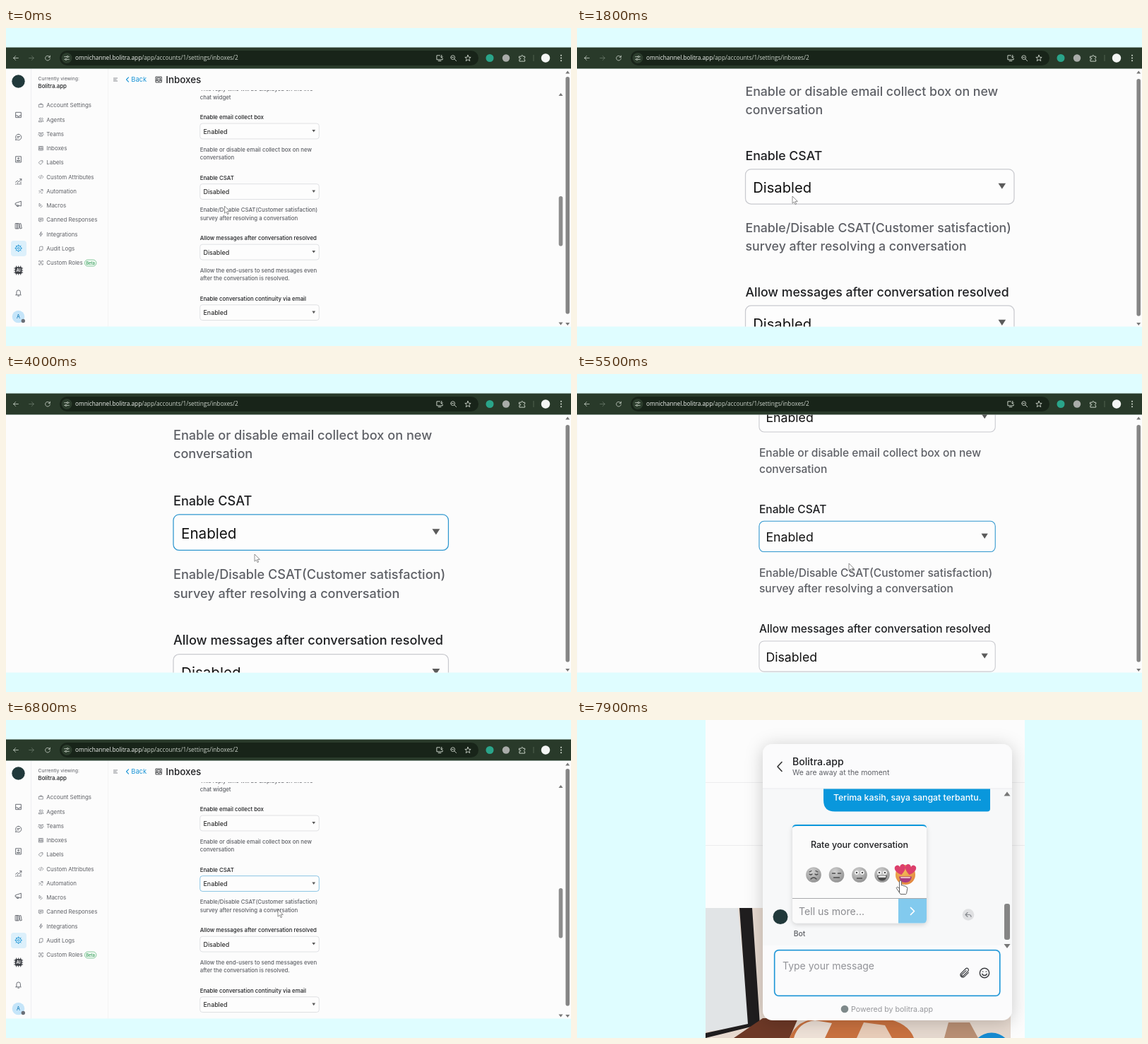
An HTML page that plays this animation: 800 px wide and 450 px high, repeating every 8000 ms.

```html
<!DOCTYPE html>
<html lang="en">
<head>
<meta charset="utf-8">
<title>Inbox settings</title>
<style>
  html, body { margin: 0; width: 100%; height: 100%; overflow: hidden; background: #dffdff; }
  svg { display: block; width: 800px; height: 450px; font-family: Inter, "Liberation Sans", sans-serif; }
  text { white-space: pre; }
  .url { font-family: "Open Sans", "Noto Sans", sans-serif; }
</style>
</head>
<body>
<svg id="stage" viewBox="0 0 800 450" xmlns="http://www.w3.org/2000/svg"></svg>
<script>
const LOOP = 8000;
const BRAND = 'Bolitra.app';
const BLUE = '#1a94d6', INK = '#1f2023', MUTED = '#5e6066', ICON = '#5f636b';

// ---- drawing helpers ----
const text = (x, cy, str, size, fill = INK, weight = 400, more = '') =>
  `<text x="${x}" y="${cy + size * 0.36}" font-size="${size}" font-weight="${weight}" fill="${fill}" ${more}>${str}</text>`;
const rect = (x, y, w, h, fill, r = 0, more = '') =>
  `<rect x="${x}" y="${y}" width="${w}" height="${h}" rx="${r}" fill="${fill}" ${more}/>`;
const disc = (x, y, r, fill, more = '') => `<circle cx="${x}" cy="${y}" r="${r}" fill="${fill}" ${more}/>`;
const path = (d, fill, more = '') => `<path d="${d}" fill="${fill}" ${more}/>`;
const line = (d, stroke, w = 1, more = '') =>
  `<path d="${d}" fill="none" stroke="${stroke}" stroke-width="${w}" stroke-linecap="round" stroke-linejoin="round" ${more}/>`;
// icon drawn on a 24 x 24 grid, centred at x, y
const icon = (d, x, y, size, stroke = ICON, w = 2) =>
  `<g transform="translate(${x - size / 2} ${y - size / 2}) scale(${size / 24})">${line(d, stroke, w)}</g>`;
const tri = (x, y, w, h, fill) => path(`M${x - w / 2} ${y - h / 2}h${w}l${-w / 2} ${h}z`, fill);

const ring = (x, y, r) => `M${x - r} ${y}a${r} ${r} 0 1 0 ${2 * r} 0a${r} ${r} 0 1 0 ${-2 * r} 0`;
const teeth = Array.from({ length: 8 }, (_, i) => {
  const a = i * Math.PI / 4, p = r => `${12 + r * Math.cos(a)} ${12 + r * Math.sin(a)}`;
  return `M${p(8)}L${p(10.5)}`;
}).join('');
const I = {
  inbox: 'M4 4h16v16H4zM4 14h5l1 3h4l1-3h5',
  inboxFull: 'M3 3h18v18H3zM7 7h10v6H7zM3 15h5l2 3h4l2-3h5',
  chat: 'M12 3a9 9 0 1 1-4.500 16.800L3 21l1.200-4.500A9 9 0 0 1 12 3M8 10h8M8 14h5',
  contact: 'M4 3h16v18H4zM8 17h8v-2h-8z' + ring(12, 9, 2),
  chart: 'M3 14l6-5 4 4 8-9M16 4h5v5M4 21v-2M9 21v-6M14 21v-3M19 21v-8',
  horn: 'M3 10l17-6v15L3 15zM7 16v4h5v-3',
  books: 'M3 4h5v16H3zM8 4h5v16H8zM15 5l4-1 3 15-4 1z',
  gear: ring(12, 12, 8) + ring(12, 12, 3) + teeth,
  bell: 'M6 17v-7a6 6 0 0 1 12 0v7l2 2H4zM10 22h4',
  bag: 'M3 8h18v12H3zM8 8V4h8v4',
  people: ring(9, 8, 4) + 'M2 21v-4h14v4zM17 4a4 4 0 0 1 0 8M19 16h3v5',
  team: ring(12, 9, 3) + ring(4, 7, 2) + ring(20, 7, 2) + 'M6 21v-5h12v5zM1 17v-4M23 17v-4',
  tag: 'M12 3h8v8L10 21l-8-8zM16 8v.1',
  code: 'M7 6l-6 6 6 6M17 6l6 6-6 6M14 4l-4 16',
  flow: 'M4 20L18 6M12 4h8v8M3 11h5M13 20h6',
  macro: 'M5 3l9 7-9 5zM10 21l9-7',
  canned: 'M3 4h18v13h-9l-5 4v-4H3zM7 9h10M7 13h6',
  bolt: 'M13 2L5 14h6l-1 8 9-12h-7z',
  log: 'M6 21V5l4-2h10v14M3 21h13v-4',
  role: 'M3 8V3h5M16 3h5v5M21 16v5h-5M8 21H3v-5M7 18a5 4 0 0 1 10 0' + ring(12, 9, 3),
  clip: 'M20 11l-9 9a5 5 0 0 1-7-7l10-10a3.500 3.500 0 0 1 5 5L9 18a1.500 1.500 0 0 1-3-3l9-8',
  smile: ring(12, 12, 10) + 'M7 14a5.500 5.500 0 0 0 10 0M8.500 9v.2M15.500 9v.2',
  star: 'M12 2l3 7 7 .5-5.500 4.700L18.500 22 12 17.500 5.500 22l2-7.800L2 9.500 9 9z',
  puzzle: 'M3 7h6V5a3 3 0 0 1 5 0v2h6v5h-1a3 3 0 0 0 0 5h1v5H3v-6h2a2 2 0 0 0 0-4H3z',
  lens: ring(10, 10, 7) + 'M15 15l7 7M7 10h6',
  install: 'M13 4H3v13h18v-4M8 21h8M18 3v8M15 8l3 3 3-3',
  tune: 'M3 7h8M19 7h2M3 17h2M13 17h8' + ring(15, 7, 3) + ring(9, 17, 3),
  reload: 'M20 8a9 9 0 1 0 1 6M21 3v6h-6',
  arrow: 'M21 12H3M11 4l-8 8 8 8'
};

// ---- browser chrome ----
function chrome() {
  const pale = '#d5ddd3';
  return rect(0, 27.5, 800, 30, '#293a2a') +
    icon(I.arrow, 14, 42.5, 9, pale) +
    `<g transform="rotate(180 36 42.5)">${icon(I.arrow, 36, 42.5, 9, '#6d7b6c')}</g>` +
    icon(I.reload, 59, 42.5, 9, pale) +
    rect(76, 32, 593, 21, '#182419', 10.5) + disc(86, 42.5, 7.5, '#2c3d2d') + icon(I.tune, 86, 42.5, 9, pale) +
    text(98, 42.5, `omnichannel.${BRAND.toLowerCase()}<tspan fill="#cbd3ca">/app/accounts/1/settings/inboxes/2</tspan>`, 8.25, '#f3f6f2', 400, 'class="url"') +
    icon(I.install, 614, 42.5, 11, pale) + icon(I.lens, 633.5, 42.5, 10, pale) + icon(I.star, 654, 42.5, 10, pale) +
    disc(685, 42.5, 5.5, '#2aa58a') + disc(708, 42.5, 5.2, '#a9aca9') + icon(I.puzzle, 731, 42.5, 11, pale) +
    rect(746.5, 38, 1, 9, '#52624f') + disc(764, 42.5, 6.2, '#f4f6f4') +
    [38.7, 42.5, 46.3].map(y => disc(786, y, 1, pale)).join('');
}

// ---- settings page ----
function rail() {
  const icons = ['inbox', 'chat', 'contact', 'chart', 'horn', 'books', 'gear', '', 'bell'];
  let out = rect(7, 301, 22, 22, '#dcf0fb', 4) + disc(17.5, 75.5, 9.2, '#21393b');
  icons.forEach((name, i) => {
    if (name) out += icon(I[name], 17.7, 123 + i * 31.45, 11, name === 'gear' ? BLUE : ICON);
  });
  const pins = [-3, 0, 3].map(k => `M${17.7 + k} 337v12M11.700 ${343 + k}h12`).join('');
  out += line(pins, '#3c3f44', 1) + rect(13, 338.3, 9.4, 9.4, '#3c3f44', 1) +
    text(17.7, 343, 'AI', 6, '#fff', 700, 'text-anchor="middle"');
  return out + disc(17.5, 408.5, 8.8, '#c5e5f9') + text(17.5, 408.5, 'A', 7, '#177cb8', 500, 'text-anchor="middle"') +
    disc(24.3, 414.5, 2.7, '#6b7078');
}

function menu() {
  const items = [['bag', 'Account Settings'], ['people', 'Agents'], ['team', 'Teams'], ['inboxFull', 'Inboxes'],
    ['tag', 'Labels'], ['code', 'Custom Attributes'], ['flow', 'Automation'], ['macro', 'Macros'],
    ['canned', 'Canned Responses'], ['bolt', 'Integrations'], ['log', 'Audit Logs'], ['role', 'Custom Roles']];
  return text(45.5, 71.5, 'Currently viewing:', 6.8, MUTED) + text(45.5, 82.5, BRAND, 7.84, INK, 500) +
    items.map(([name, label], i) => {
      const y = 109.5 + i * 20.25;
      return icon(I[name], 49.5, y, 7.5) + text(57.3, y, label, 7.9, MUTED);
    }).join('') +
    rect(111.3, 328, 16.6, 9, '#f3fbf5', 4.5, 'stroke="#58b576" stroke-width=".7"') +
    text(119.6, 332.5, 'Beta', 5.9, '#2f9a56', 500, 'text-anchor="middle"');
}

function form() {
  const size = 7.84, left = 274.7;
  const fields = [
    ['Enable email collect box', 'Enabled', 'Enable or disable email collect box on new', 'conversation'],
    ['Enable CSAT', 'Disabled', 'Enable/Disable CSAT(Customer satisfaction)', 'survey after resolving a conversation'],
    ['Allow messages after conversation resolved', 'Disabled', 'Allow the end-users to send messages even', 'after the conversation is resolved.'],
    ['Enable conversation continuity via email', 'Enabled', '', '']];
  const help = (y, a, b) => text(left, y, a, size, MUTED, 500) + text(left, y + 11.4, b, size, MUTED, 500);
  return help(86.4, 'This reply time will be displayed on the live', 'chat widget') +
    fields.map(([label, value, a, b], i) => {
      const y = 126.5 + i * 85.55, id = i === 1;
      return text(left, y, label, size, INK, 500) +
        rect(left, y + 8.6, 168.6, 21.8, '#fdfdfd', 3.5, `stroke="#c9cacf" stroke-width=".55" ${id ? 'id="box"' : ''}`) +
        text(279.5, y + 20, value, 8.93, '#111', 400, id ? 'id="value"' : '') +
        tri(435.7, y + 19.2, 4.7, 3.6, '#5b5b5b') + help(y + 45.4, a, b);
    }).join('');
}

function page() {
  return rect(0, 57, 800, 366, '#fcfcfc') + rect(35, 57, .7, 366, '#e9e9ec') + rect(144, 57, .7, 366, '#efeff1') +
    rail() + menu() +
    icon('M3 5h18M3 12h13M3 19h18', 155, 73, 7, ICON, 2.4) + line('M173.500 69.800l-3 3.200 3 3.200', BLUE, 1.1) +
    text(177.3, 73, 'Back', 9.3, BLUE) + icon(I.inboxFull, 216.3, 73, 10.5, '#2b2d31') +
    text(226.3, 73.2, 'Inboxes', 13.4, INK, 500) +
    `<g clip-path="url(#formClip)">${form()}</g>` +
    rect(782.7, 238, 5.6, 70.5, '#8d8d8d', 2.8) + tri(785.5, 94, 6, -4, '#777') + tri(785.5, 418.5, 6, 4, '#777');
}

const dropdown = `<g id="drop">${rect(235.7, 249.5, 390.6, 33, '#1b1c1c', 0, 'id="dropBg"')}
  <g id="options">${rect(235.7, 282.5, 390.6, 33, '#4a4b4b', 0, 'id="mark"')}
  ${text(247, 266, 'Enabled', 20.5, '#f4f4f4')}${text(247, 299, 'Disabled', 20.5, '#f4f4f4')}</g></g>`;

const scrollbar = rect(791.5, 57.5, 8.5, 365.5, '#fcfcfc') + tri(795.2, 62.5, 6, -4, '#777') +
  rect(792.4, 69, 5.6, 335.5, '#858585', 2.8, 'id="thumb"') + tri(795.2, 419, 6, 4, '#777');

// ---- chat widget ----
function face(x, kind) {
  const dark = '#4b4b4b', y = 219;
  const mouth = [`M${x - 4} ${y + 6}q4 -4 8 0`, `M${x - 4} ${y + 4}h8`, `M${x - 3.5} ${y + 5}h7`][kind];
  let out = disc(x, y, 10.8, 'url(#grey)');
  if (kind === 0) out += line(`M${x - 6} ${y - 1}q2 2 4 0M${x + 2} ${y - 1}q2 2 4 0M${x - 6} ${y - 4}l3 -1.500M${x + 6} ${y - 4}l-3 -1.500`, dark, 1.2);
  if (kind === 1) out += line(`M${x - 6} ${y - 2}h4M${x + 2} ${y - 2}h4`, dark, 1.4);
  if (kind > 1) out += [-4, 4].map(k => disc(x + k, y - 3, 2.7, '#fff') + disc(x + k, y - 3, 1.3, dark)).join('');
  return out + (kind === 3
    ? path(`M${x - 7} ${y + 1}h14q-1 7.500 -7 7.500t-7 -7.500z`, dark) + rect(x - 5.5, y + 1.5, 11, 2.2, '#fff', 1)
    : line(mouth, dark, 1.4));
}
const heart = (x, y, turn) =>
  path('M0 6C-9 0 -7 -6 -3 -6Q-.5 -6 0 -3Q.5 -6 3 -6C7 -6 9 0 0 6z', '#dc3f6c', `transform="translate(${x} ${y}) rotate(${turn}) scale(1.2)"`);
const love = `<g id="love">${disc(0, 0, 14, 'url(#warm)')}
  ${path('M-9 2.500h18q-1 8.500 -9 8.500t-9 -8.500z', '#a93a80')}${rect(-7, 3, 14, 2, '#e9b9c4', 1)}
  ${heart(-7, -7, -12)}${heart(7, -7, 12)}</g>`;

function photo() {
  return rect(182, 266, 432, 184, '#e6d9cf') +
    path('M182 266h46l16 167-62 8z', '#e1e4e6') + path('M230 266h18l11 165-77 19v-7l60-13z', '#1f1d1e') +
    path('M222 450l41-28h50l-12 28z', '#6d3826') + path('M301 450q10-27 44-28h90q34 6 42 28z', '#c9713f') +
    path('M307 450q6-22 30-25l24 4-10 21z', '#efe2d8') + path('M396 450l10-22 30 4 10 18z', '#e9cdb9') +
    path('M520 450l6-22h30l12 22z', '#b98f74');
}

function chat() {
  return rect(182, 0, 452, 450, '#fcfcfc') + rect(182, 88, 452, 1, '#ededee') + rect(182, 177, 452, 1, '#ededee') +
    photo() + disc(587, 471, 28.5, '#168bd1') +
    rect(263, 34, 353, 391, '#fbfbfc', 14, 'filter="url(#soft)"') + rect(263, 97, 353, 222, '#f7f8f9') +
    rect(263, 96.5, 353, 1, '#ececef') +
    line('M290 59.500l-6 6.500 6 6.500', '#333', 1.6) + text(305, 58.5, BRAND, 14.1, INK, 500) +
    text(305, 74.5, 'We are away at the moment', 10.45, '#5f6167') +
    path('M349 97.500h236v28q0 4-4 4H365q-16 0-16-16z', '#0997dc') +
    text(363, 109.8, 'Terima kasih, saya sangat terbantu.', 12.35, '#fff', 500) +
    rect(305, 148, 190, 139.5, '#fbfbfb', 6, 'filter="url(#card)"') + path('M305 153q0-5 6-5h178q6 0 6 5q-1-3-6-3H311q-5 0-6 3z', '#0997dc') +
    text(400, 176, 'Rate your conversation', 12.55, INK, 500, 'text-anchor="middle"') +
    [335, 367.5, 400, 432].map(face).join('') + love +
    rect(305, 252, 190, 1, '#a8a9ab') + text(314, 270.5, 'Tell us more...', 14.1, '#8b8c90') +
    path('M455 253h40v29q0 5.500-5.500 5.500H455z', '#82caee') + line('M472.500 265.500l5 5-5 5', '#fff', 1.7) +
    disc(288, 278.5, 10.5, '#21393b') + text(306.7, 302.5, 'Bot', 10.4, '#5c5e63', 500) +
    disc(554, 275.5, 8.3, '#dfe0e2') + line('M553 272.500l-3 3 3 3M550 275.500h5q3 0 3 3', '#85888e', 1.1) +
    rect(605, 260, 8, 51, '#858585', 3) + tri(609, 104.5, 9, -6, '#777') + tri(609, 320, 9, 6, '#777') +
    rect(278.5, 324.5, 321.5, 67, '#c9e6f7', 7) + rect(279.7, 325.7, 319, 64.6, '#fbfbfc', 6, `stroke="${BLUE}" stroke-width="1.5"`) +
    text(291, 348, 'Type your message', 14, '#929398') + icon(I.clip, 549, 358, 16, '#3c3e42', 1.8) + icon(I.smile, 577, 358, 16, '#3c3e42', 2.2) +
    disc(379, 409, 5.3, '#7e898a') + text(388, 409, `Powered by ${BRAND.toLowerCase()}`, 10.65, '#97989c') +
    `<g id="hand">${path('M-2.500 9V-6q0-2 1.500-2t1.500 2V-1q3-1 3 1q3-1 3 1q2.500 0 2.300 2.500l-1 5.500q0 2-1 2.500H-1L-6 4q-1.500-2 0-2.500t3.500 2z', '#fff', 'stroke="#555" stroke-width=".9" stroke-linejoin="round"')}</g>`;
}

const shadow = (id, dy, blur, a) => `<filter id="${id}" x="-20%" y="-20%" width="140%" height="140%"><feDropShadow dx="0" dy="${dy}" stdDeviation="${blur}" flood-color="#000" flood-opacity="${a}"/></filter>`;
const fade = (id, a, b) => `<radialGradient id="${id}" cx=".4" cy=".3" r=".75"><stop offset="0" stop-color="${a}"/><stop offset="1" stop-color="${b}"/></radialGradient>`;

document.getElementById('stage').innerHTML = `<defs>
  <clipPath id="view"><rect x="0" y="57.5" width="800" height="365"/></clipPath>
  <clipPath id="column"><rect x="182" y="0" width="452" height="450"/></clipPath>
  <clipPath id="formClip"><rect x="144" y="88" width="638" height="340"/></clipPath>
  ${shadow('soft', 3, 12, .2)}${shadow('card', 2, 3, .16)}${fade('grey', '#d2d2d2', '#8f8f8f')}${fade('warm', '#f3bd58', '#e2853f')}</defs>
  ${rect(0, 0, 800, 450, '#dffdff')}
  <g id="settings"><g clip-path="url(#view)"><g id="zoom">${page()}</g>${dropdown}${scrollbar}</g>${chrome()}
    ${path('M0 0v10.200l2.400-2.200 1.700 3.700 1.600-.7-1.700-3.600h3.300z', '#fff', 'id="pointer" stroke="#777" stroke-width=".8" stroke-linejoin="round"')}</g>
  <g id="chat" clip-path="url(#column)">${chat()}</g>`;

// ---- motion ----
const $ = id => document.getElementById(id);
const show = (id, on) => $(id).setAttribute('display', on ? 'inline' : 'none');
const move = (id, x, y, s = 1) => $(id).setAttribute('transform', `translate(${x} ${y}) scale(${s})`);
const smooth = u => u * u * (3 - 2 * u);

// rows: [time, value, ...]; holds the ends
function track(rows, t, ease = u => u) {
  const n = rows.findIndex(r => r[0] > t);
  if (n < 0) return rows[rows.length - 1].slice(1);
  if (n === 0) return rows[0].slice(1);
  const a = rows[n - 1], b = rows[n], u = ease((t - a[0]) / (b[0] - a[0]));
  return a.slice(1).map((v, i) => v + (b[i + 1] - v) * u);
}

const FULL = 2.31;
const ZOOM = [[800, 1], [1200, 1.6], [1850, FULL], [5200, FULL], [5500, 1.984], [6250, 1]];
const POINTER = [[0, 309.5, 252], [700, 305, 238], [1900, 305, 238], [2500, 361, 229], [2900, 361, 229],
  [3400, 352, 255], [4400, 352, 255], [5100, 385, 268]];
const HAND = [[7300, 470, 262], [7700, 459, 235]];
const IN = [303.5, 237.2], OUT = [385, 265];
const OPEN = 2700, PICK = 3700, CUT = 7300, HOVER = 7600;

// pinch about the pointer, kept inside the page on the way out
function offset(s, t, axis) {
  const [lo, hi] = axis ? [57, 422] : [0, 792];
  const c = IN[axis], o = OUT[axis];
  const v = t < 5200 ? c * (1 - s) : o - (o - c * (1 - FULL)) * s / FULL;
  return Math.min(lo * (1 - s), Math.max(hi * (1 - s), v));
}

function draw(t) {
  const inChat = t >= CUT;
  show('settings', !inChat);
  show('chat', inChat);
  if (inChat) {
    move('hand', ...track(HAND, t, smooth));
    move('love', 465, 219, track([[HOVER, .77], [7850, 1]], t)[0]);
    $('love').style.filter = t < HOVER ? 'grayscale(1)' : 'none';
    return;
  }
  const [s] = track(ZOOM, t);
  move('zoom', offset(s, t, 0), offset(s, t, 1), s);
  $('thumb').setAttribute('y', s > 1 ? 72 : 69);
  move('pointer', ...track(POINTER, t, smooth));
  show('drop', t >= OPEN && t < PICK);
  show('options', t >= OPEN + 100);
  $('dropBg').setAttribute('height', t < OPEN + 100 ? 33 : 66);
  $('mark').setAttribute('y', t < 3200 ? 282.5 : 249.5);
  $('box').setAttribute('stroke', t >= OPEN + 100 ? '#2f97cf' : '#c9cacf');
  $('value').textContent = t >= PICK ? 'Enabled' : 'Disabled';
}

const start = performance.now();
function tick() {
  draw((performance.now() - start) % LOOP);
  requestAnimationFrame(tick);
}
tick();
</script>
</body>
</html>
```
